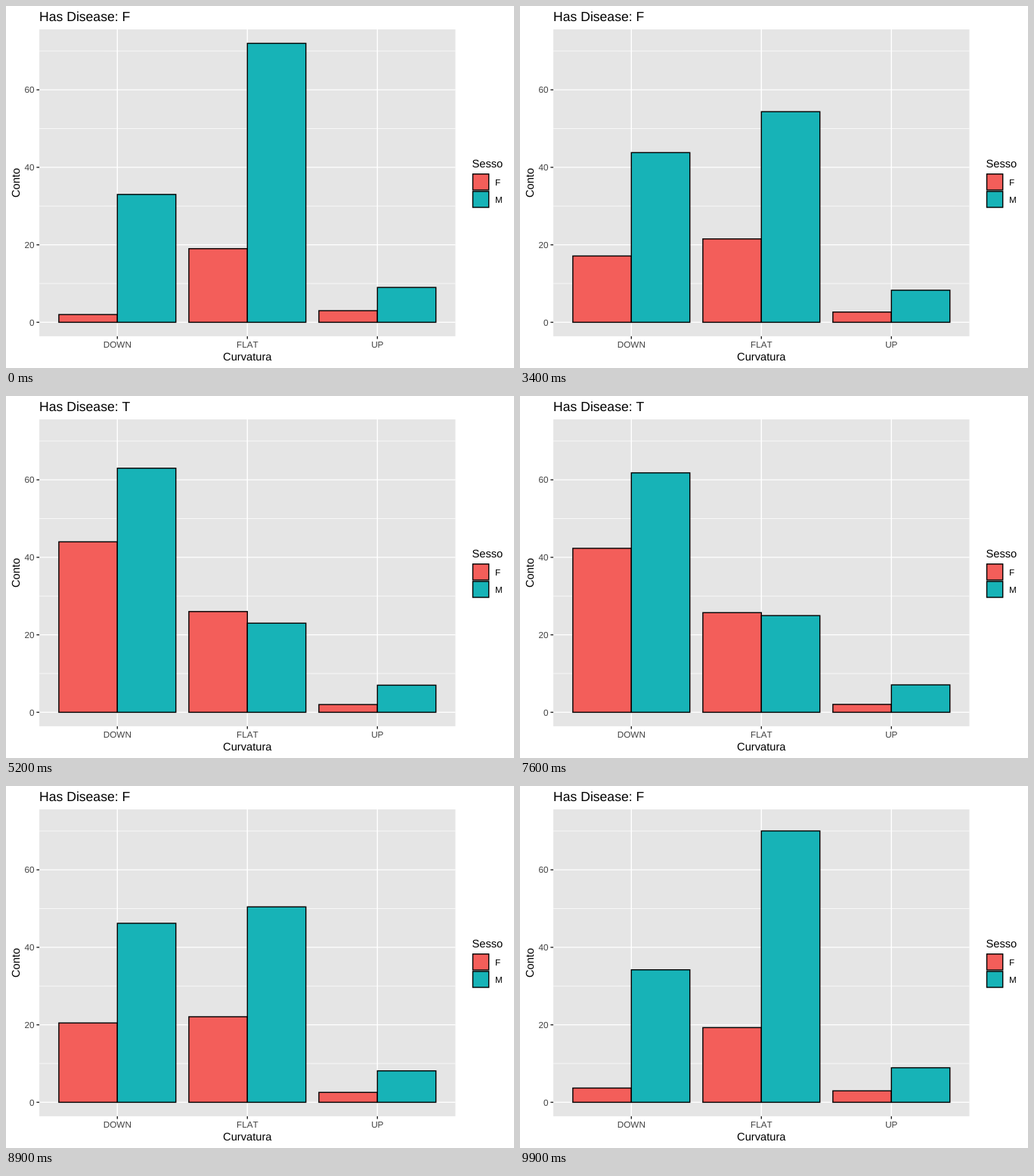
An HTML page with a canvas for the animation above (10 s loop, 672 by 480 pixels).

```html
<!DOCTYPE html>
<html lang="it">
<head>
<meta charset="utf-8">
<title>Curvatura</title>
<style>
html, body { margin: 0; width: 100%; height: 100%; overflow: hidden; background: #fff; }
canvas { display: block; width: 672px; height: 480px; }
</style>
</head>
<body>
<canvas id="plot" width="672" height="480"></canvas>
<script>
const ctx = document.getElementById('plot').getContext('2d');

const LOOP = 10000, STEP = 100;
const RED = '#f35e5a', TEAL = '#17b3b7', GREY = '#404040';
const LINE = 1.42;
const panel = { left: 44.1, top: 31, right: 594.5, bottom: 437.9 };
const unitX = (panel.right - panel.left) / 3.2;
const unitY = (panel.bottom - panel.top) / 79.2;
const xAt = v => panel.left + (v - 0.4) * unitX;
const yAt = v => panel.bottom - (v + 3.6) * unitY;

// Counts as [F, M] without and with the disease
const groups = [
  { name: 'DOWN', no: [2, 33], yes: [44, 63] },
  { name: 'FLAT', no: [19, 72], yes: [26, 23] },
  { name: 'UP', no: [3, 9], yes: [2, 7] }
];

function text(str, x, y, size, color = '#000', align = 'left') {
  ctx.font = size + 'px "Liberation Sans", Arial, sans-serif';
  ctx.textAlign = align;
  ctx.fillStyle = color;
  ctx.fillText(str, x, y);
}

function line(x1, y1, x2, y2, color, width) {
  ctx.strokeStyle = color;
  ctx.lineWidth = width;
  ctx.beginPath();
  ctx.moveTo(x1, y1);
  ctx.lineTo(x2, y2);
  ctx.stroke();
}

function box(x, y, w, h, fill) {
  ctx.fillStyle = fill;
  ctx.fillRect(x, y, w, h);
  ctx.strokeStyle = '#000';
  ctx.lineWidth = LINE;
  ctx.strokeRect(x, y, w, h);
}

function drawGrid() {
  const { left, top, right, bottom } = panel;
  ctx.fillStyle = '#e5e5e5';
  ctx.fillRect(left, top, right - left, bottom - top);
  for (let v = 10; v <= 70; v += 20) line(left, yAt(v), right, yAt(v), '#fff', LINE / 2);
  for (let v = 0; v <= 60; v += 20) {
    const y = yAt(v);
    line(left, y, right, y, '#fff', LINE);
    line(left - 3.67, y, left, y, '#272727', LINE);
    text(v, left - 6.6, y + 4.2, 11.73, GREY, 'right');
  }
  groups.forEach((g, i) => {
    const x = xAt(i + 1);
    line(x, top, x, bottom, '#fff', LINE);
    line(x, bottom, x, bottom + 3.67, '#272727', LINE);
    text(g.name, x, 453, 11.73, GREY, 'center');
  });
}

function drawBars(share) {
  const w = 0.45 * unitX;
  groups.forEach((g, i) => {
    [RED, TEAL].forEach((color, k) => {
      const v = g.no[k] + (g.yes[k] - g.no[k]) * share;
      box(xAt(i + 1) + (k - 1) * w, yAt(v), w, v * unitY, color);
    });
  });
}

function drawLabels(share) {
  text('Has Disease: ' + (share > 0.5 ? 'T' : 'F'), 44, 20, 17.6);
  text('Curvatura', 319.3, 469.7, 14.67, '#000', 'center');
  ctx.save();
  ctx.translate(17.9, 234.5);
  ctx.rotate(-Math.PI / 2);
  text('Conto', 0, 0, 14.67, '#000', 'center');
  ctx.restore();

  text('Sesso', 616.5, 214, 14.67);
  box(617.5, 222.8, 21.15, 21.15, RED);
  box(617.5, 245.85, 21.15, 21.15, TEAL);
  text('F', 646.9, 237.8, 11.73);
  text('M', 646.9, 260.9, 11.73);
}

// Share of the diseased state: hold, rise, hold, fall
function shareAt(ms) {
  const q = ms / 2500;
  if (q < 1) return 0;
  if (q < 2) return q - 1;
  if (q < 3) return 1;
  return 4 - q;
}

function draw(now) {
  const ms = Math.floor((now % LOOP) / STEP) * STEP;
  const share = shareAt(ms);
  ctx.fillStyle = '#fff';
  ctx.fillRect(0, 0, 672, 480);
  drawGrid();
  drawBars(share);
  drawLabels(share);
}

ctx.fontKerning = 'none';
ctx.textRendering = 'geometricPrecision';

let start;
function tick(now) {
  start ??= now;
  draw(Math.max(0, now - start));
  requestAnimationFrame(tick);
}
draw(0);
requestAnimationFrame(tick);
</script>
</body>
</html>
```
